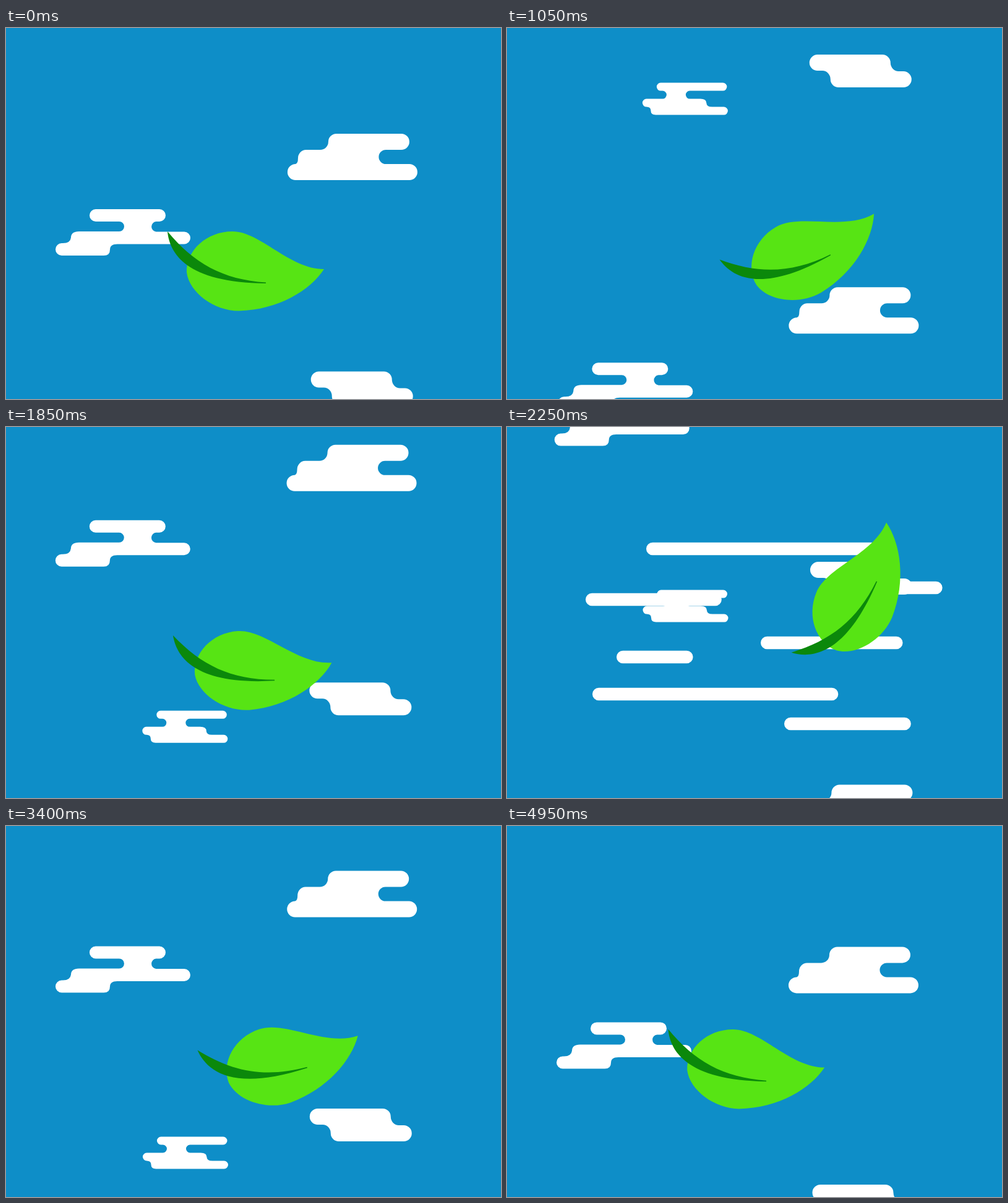
Recreate the animation shown at these times as an HTML page with a canvas. Size 800 by 600 pixels, loop 5000 ms.

```html
<!DOCTYPE html>
<html lang="en">
<head>
<meta charset="utf-8">
<title>Leaf in the wind</title>
<style>
html, body { margin: 0; width: 100%; height: 100%; overflow: hidden; background: #0e8ec8; }
canvas { display: block; }
</style>
</head>
<body>
<canvas id="stage" width="800" height="600"></canvas>
<script>
const ctx = document.getElementById('stage').getContext('2d');
const LOOP = 5000, STEP = 50;
const SKY = '#0e8ec8', LEAF = '#57e414', STEM = '#0b880b', WHITE = '#fff';

// Each cloud has its top edge at y = 0; dy is its place within the group.
const clouds = [
  { dy: 0, path: 'M534 0H639a13 13 0 0 1 0 26H614a11.5 11.5 0 0 0 0 23H652a13 13 0 0 1 0 26H468a13 13 0 0 1 0-26Q472 48 472 40a13 14 0 0 1 13-14H508a13 13 0 0 0 13-13a13 13 0 0 1 13-13Z' },
  { dy: 122, path: 'M145 0H248a10 10 0 0 1 0 20H242.5a8.3 8.3 0 0 0 0 16.5H288a10 10 0 0 1 0 20H180q-12 0-12 9q0 9.5-10 9.5H90a10 10 0 0 1 0-20H92q12 0 13-9q0-10 13-10H183a8 8 0 0 0 0-16H145a10 10 0 0 1 0-20Z' },
  { dy: 384.5, path: 'M503 0H608a13 13 0 0 1 13 13a13 14 0 0 0 13 14H642a13 13 0 0 1 0 26H537a13 13 0 0 1-13-13a13 14 0 0 0-13-14H503a13 13 0 0 1 0-26Z' },
  { dy: 430, path: 'M249 0H349.5a6.5 6.5 0 0 1 0 13H296a6.5 6.5 0 0 0 0 13H313q10 0 10 7q0 6 9 6H351a6.5 6.5 0 0 1 0 13H241q-8 0-8-7q0-6-7-6a6.5 6.5 0 0 1 0-13H252a6.5 6.5 0 0 0 0-13H249a6.5 6.5 0 0 1 0-13Z' }
].map(c => ({ dy: c.dy, shape: new Path2D(c.path) }));

// The group is at height y at time t and rises by v pixels per ms.
const passes = [
  { t: 0, y: 171, v: 0.488 },
  { t: 1450, y: 224, v: 0.488 },
  { t: 3400, y: 72.5, v: 0.44 },
  { t: LOOP, y: 171, v: 0.488 }
];

// Wind streaks: y, left end, length.
const streaks = [
  [197, 225, 424], [260, 520, 208], [279, 127, 249], [349, 410, 260],
  [372, 177, 140], [432, 138, 450], [480, 448, 232]
];

const leafShape = new Path2D('M514 390C458 390 411 329 366 329C324 329 291 360 292 395C296 428 337 457.5 376 457.5C440 456 492 424 514 390Z');
const stemShape = new Path2D('M261 329C264 363 290 412 420 413L420 411.5C350 407 303 380 261 329Z');
const PIVOT = { x: 387, y: 198 };
// Swing to the right in degrees: time, angle.
const swing = [[0, 0], [800, 36], [1770, 0], [2350, 73.2], [4230, -19.7], [LOOP, 0]];

const progress = (t, from, to) => Math.min(1, Math.max(0, (t - from) / (to - from)));
const smooth = u => u * u * (3 - 2 * u);

function swingAngle(t) {
  const i = swing.findIndex(key => t < key[0]);
  const [t0, a0] = swing[i - 1], [t1, a1] = swing[i];
  return a0 + (a1 - a0) * smooth(progress(t, t0, t1));
}

// Clouds lean slightly sideways near the top and bottom of the stage.
const cloudDrift = y => 3 * ((y - 265) / 300) ** 3;

function drawClouds(t) {
  ctx.fillStyle = WHITE;
  for (const pass of passes) {
    for (const cloud of clouds) {
      const y = pass.y + cloud.dy - pass.v * (t - pass.t);
      if (y < -80 || y > 600) continue;
      ctx.save();
      ctx.translate(cloudDrift(y), y);
      ctx.fill(cloud.shape);
      ctx.restore();
    }
  }
}

function drawStreaks(t) {
  const head = 1 - (1 - progress(t, 1850, 2458)) ** 2;
  const tail = progress(t, 2250, 2750) ** 2;
  if (head <= tail) return;
  const r = 10.3;
  ctx.strokeStyle = WHITE;
  ctx.lineWidth = 2 * r;
  ctx.lineCap = 'round';
  ctx.beginPath();
  for (const [y, x, length] of streaks) {
    const start = x + r + length * tail;
    ctx.moveTo(start, y);
    ctx.lineTo(Math.max(start + 0.1, x - r + length * head), y);
  }
  ctx.stroke();
}

function drawLeaf(t) {
  ctx.save();
  ctx.translate(PIVOT.x, PIVOT.y);
  ctx.rotate(-swingAngle(t) * Math.PI / 180);
  ctx.translate(-PIVOT.x, -PIVOT.y);
  ctx.fillStyle = LEAF;
  ctx.fill(leafShape);
  ctx.fillStyle = STEM;
  ctx.fill(stemShape);
  ctx.restore();
}

function draw(t) {
  ctx.fillStyle = SKY;
  ctx.fillRect(0, 0, 800, 600);
  drawClouds(t);
  drawStreaks(t);
  drawLeaf(t);
}

const begin = performance.now();
function tick() {
  const t = (performance.now() - begin) % LOOP;
  draw(Math.floor(t / STEP) * STEP);
  requestAnimationFrame(tick);
}
tick();
</script>
</body>
</html>
```
